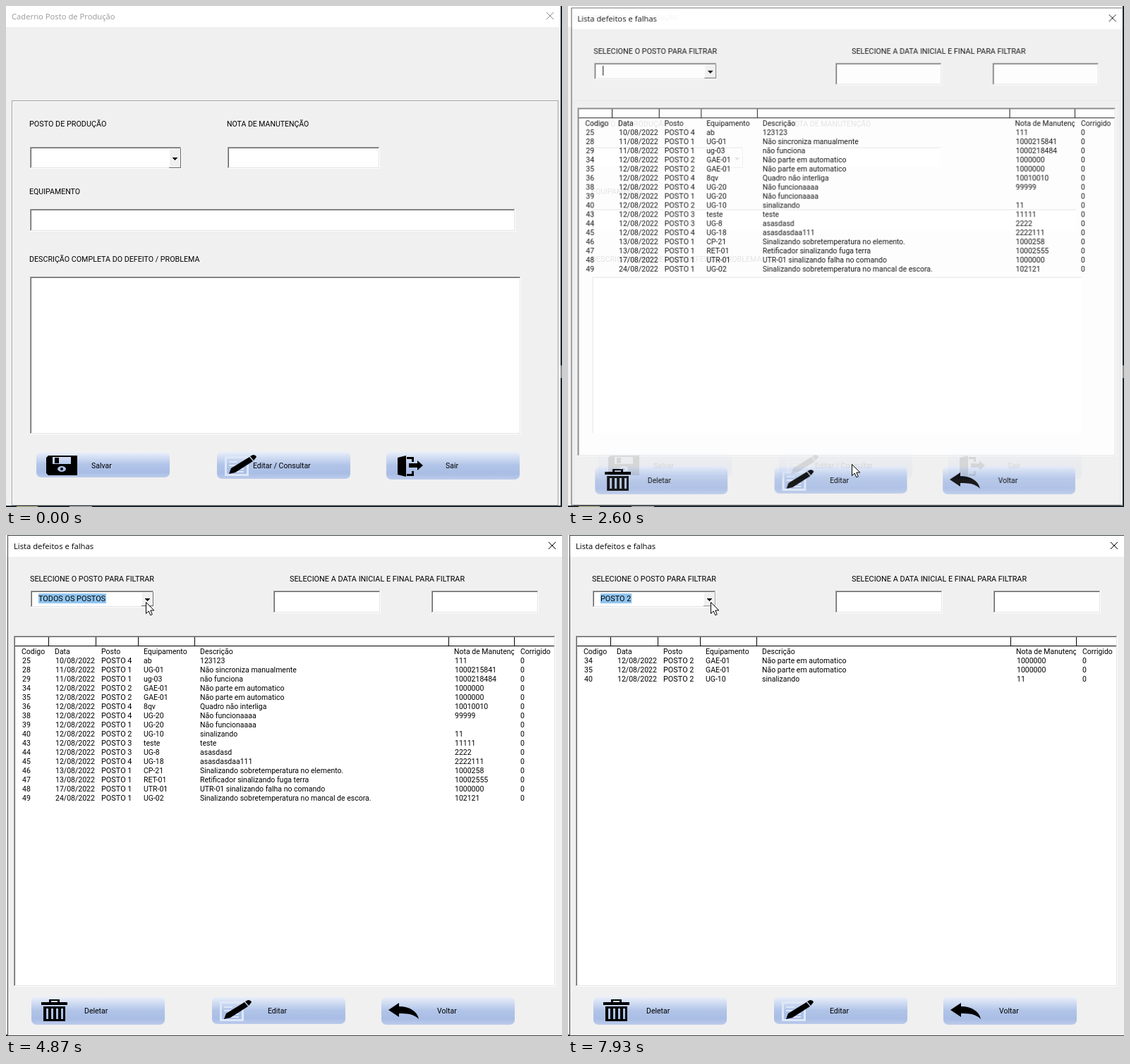
Write an HTML page with a canvas that moves like this. It is 788 by 711 pixels and loops after 8000 ms.

```html
<!DOCTYPE html>
<html lang="pt">
<head>
<meta charset="utf-8">
<style>
  html, body { margin: 0; width: 100%; height: 100%; overflow: hidden; background: #f0f0f0; }
  canvas, svg { position: absolute; left: 0; top: 0; }
  #list { transform-origin: 395px 355px; }
</style>
</head>
<body>
<canvas id="form" width="788" height="711"></canvas>
<canvas id="list" width="788" height="711"></canvas>
<svg id="pointer" width="14" height="21">
  <path d="M.5 .5V16.5L4.2 13L6.8 18.8L9.3 17.7L6.8 12H11.8Z" fill="#fff" stroke="#000"/>
</svg>
<script>
const LOOP = 8000, STEP = 200 / 3;
const formCanvas = document.getElementById('form');
const listCanvas = document.getElementById('list');
const pointer = document.getElementById('pointer');
let ctx;

const MENU_TOP = 104, ROW_HEIGHT = 13;
const OPTIONS = ['TODOS OS POSTOS', 'POSTO 1', 'POSTO 2', 'POSTO 3', 'POSTO 4'];
const COLUMNS = [22, 69, 135, 195, 275, 635, 729];
const HEADERS = ['Codigo', 'Data', 'Posto', 'Equipamento', 'Descrição', 'Nota de Manutenção', 'Corrigido'];
const ROWS = `25|10|4|ab|123123|111
28|11|1|UG-01|Não sincroniza manualmente|1000215841
29|11|1|ug-03|não funciona|1000218484
34|12|2|GAE-01|Não parte em automatico|1000000
35|12|2|GAE-01|Não parte em automatico|1000000
36|12|4|8qv|Quadro não interliga|10010010
38|12|4|UG-20|Não funcionaaaa|99999
39|12|1|UG-20|Não funcionaaaa|
40|12|2|UG-10|sinalizando|11
43|12|3|teste|teste|11111
44|12|3|UG-8|asasdasd|2222
45|12|4|UG-18|asasdasdaa111|2222111
46|13|1|CP-21|Sinalizando sobretemperatura no elemento.|1000258
47|13|1|RET-01|Retificador sinalizando fuga terra|10002555
48|17|1|UTR-01|UTR-01 sinalizando falha no comando|1000000
49|24|1|UG-02|Sinalizando sobretemperatura no mancal de escora.|102121`
  .split('\n').map(line => {
    const [code, day, post, ...rest] = line.split('|');
    return [code, `${day}/08/2022`, `POSTO ${post}`, ...rest, '0'];
  });

const ICONS = {
  disk: 'M14 8l3-3h41v28H17l-3-3zM23 7h26v10H23zM26 8h6v8h-6zM30 24a6 4 0 1 0 12 0a6 4 0 1 0-12 0zM34 24a2 2 0 1 0 4 0a2 2 0 1 0-4 0z',
  pencil: 'M17 32l3-8L46 8l5 6L26 30zM47 7l4-2q4 0 5 3l-4 5z',
  page: 'M11 7h34v28H11zM14 10h28v22H14zM17 14h12v2H17zM17 19h11v2H17zM25 24h13v2H25zM21 28h17v2H21z',
  exit: 'M16 9l12-3v30l-12-3zM29 8h10v7h-3v-4h-7zM29 35h10v-7h-3v4h-7zM32 17h12v-4l8 7-8 7v-4H32z',
  trash: 'M14 8h11V4h15v4h11v4H14zM28 6v2h9V6zM17 14h31v21H17zM21 17h3v15h-3zM28 17h3v15h-3zM35 17h3v15h-3zM42 17h3v15h-3z',
  back: 'M10 19L25 9v5C40 14 51 21 53 32C45 24 36 24 25 24v5z'
};

function box(x, y, w, h, color) {
  ctx.fillStyle = color;
  ctx.fillRect(x, y, w, h);
}

// y is the vertical middle of the capitals
function text(str, x, y, color = '#000', size = 10.5) {
  ctx.font = `${size}px Roboto, sans-serif`;
  ctx.fillStyle = color;
  ctx.fillText(str, x, y + 4);
}

function title(str, x, y, color) {
  ctx.font = '11.25px "Open Sans", sans-serif';
  ctx.fillStyle = color;
  ctx.fillText(str, x, y + 4);
}

function closeMark(x, y, color) {
  ctx.strokeStyle = color;
  ctx.lineWidth = 1;
  ctx.beginPath();
  for (const s of [-1, 1]) {
    ctx.moveTo(x - 5, y - 5 * s);
    ctx.lineTo(x + 5, y + 5 * s);
  }
  ctx.stroke();
}

function field(x, y, w, h) {
  box(x, y, w, h, '#fff');
  box(x, y, w - 1, h - 1, '#a0a0a0');
  box(x + 1, y + 1, w - 2, h - 2, '#e3e3e3');
  box(x + 1, y + 1, w - 3, h - 3, '#696969');
  box(x + 2, y + 2, w - 4, h - 4, '#fff');
}

function arrowButton(x, y, h, pressed) {
  box(x, y, 17, h, pressed ? '#a0a0a0' : '#696969');
  box(x, y, 16, h - 1, '#fff');
  box(x + 1, y + 1, 15, h - 2, '#f0f0f0');
  const top = y + Math.floor(h / 2) - 1;
  for (let i = 0; i < 4; i++) box(x + 5 + i, top + i, 7 - 2 * i, 1, '#000');
}

function button(x, y, h, label, labelX, labelY, icon) {
  const fill = ctx.createLinearGradient(0, y, 0, y + h);
  [[0, '#edf1fa'], [0.15, '#d9e3f5'], [0.5, '#b1c4e8'], [0.8, '#a9bde5'], [1, '#bccbeb']]
    .forEach(stop => fill.addColorStop(...stop));
  ctx.fillStyle = fill;
  ctx.beginPath();
  ctx.roundRect(x, y, 189, h, 7);
  ctx.fill();
  ctx.save();
  ctx.translate(x, y);
  if (icon === 'pencil') {
    ctx.fillStyle = '#dde7f8';
    ctx.fill(new Path2D(ICONS.page), 'evenodd');
  }
  ctx.fillStyle = '#000';
  ctx.fill(new Path2D(ICONS[icon]), 'evenodd');
  ctx.restore();
  text(label, labelX, labelY);
}

function drawForm() {
  ctx = formCanvas.getContext('2d');
  box(0, 0, 788, 711, '#f0f0f0');
  box(0, 0, 786, 30, '#fff');
  title('Caderno Posto de Produção', 8, 15, '#999');
  closeMark(771, 14, '#888');
  box(786, 0, 2, 711, '#1c272e');
  box(786, 510, 2, 18, '#8b9094');
  box(0, 709, 788, 2, '#1c272e');
  box(15, 710, 30, 1, '#e8dfa8');
  box(90, 710, 32, 1, '#ddd');

  ctx.lineWidth = 1;
  ctx.strokeStyle = '#fff';
  ctx.strokeRect(9.5, 135.5, 774, 573);
  ctx.strokeStyle = '#a0a0a0';
  ctx.strokeRect(8.5, 134.5, 774, 574);

  text('POSTO DE PRODUÇÃO', 33, 167, '#000', 10.8);
  text('NOTA DE MANUTENÇÃO', 313, 167);
  text('EQUIPAMENTO', 33, 263, '#000', 10.6);
  text('DESCRIÇÃO COMPLETA DO DEFEITO / PROBLEMA', 33, 359, '#000', 10.7);
  field(34, 200, 215, 31);
  arrowButton(231, 202, 28);
  field(314, 200, 216, 31);
  field(34, 288, 688, 32);
  field(34, 384, 696, 224);
  button(43, 633, 36, 'Salvar', 121, 652, 'disk');
  button(299, 632, 39, 'Editar / Consultar', 350, 652, 'pencil');
  button(539, 632, 40, 'Sair', 623, 652, 'exit');
}

function drawTable(filter) {
  field(11, 143, 768, 498);
  box(13, 157, 764, 1, '#000');
  for (const x of [60, 127, 187, 267, 627, 720]) box(x, 145, 1, 13, '#000');
  const rows = filter > 0 ? ROWS.filter(row => row[2] === OPTIONS[filter]) : ROWS;
  [HEADERS, ...rows].forEach((row, r) => row.forEach((cell, c) => {
    ctx.save();
    ctx.beginPath();
    ctx.rect(0, 158, c === 5 ? 720 : 777, 480);
    ctx.clip();
    const indent = r && [0, 1, 5].includes(c) ? 1 : 0;
    text(cell, COLUMNS[c] + indent, 165 + ROW_HEIGHT * r, '#000', r && c === 2 ? 10.9 : 10.5);
    ctx.restore();
  }));
}

function drawMenu(active) {
  box(35, 103, 176, 67, '#000');
  box(36, MENU_TOP, 174, 65, '#fff');
  if (active >= 0) {
    const top = MENU_TOP + ROW_HEIGHT * active;
    box(36, top, 174, ROW_HEIGHT, '#0078d7');
    if (!active) {
      ctx.strokeStyle = '#ff8728';
      ctx.setLineDash([1, 1]);
      ctx.strokeRect(36.5, top + 0.5, 173, 12);
      ctx.setLineDash([]);
    }
  }
  OPTIONS.forEach((option, i) =>
    text(option, 45, 111 + ROW_HEIGHT * i, i === active ? '#fff' : '#000', 10.85));
}

function drawList({ chosen, open, pressed, caret, active }) {
  ctx = listCanvas.getContext('2d');
  ctx.clearRect(0, 0, 788, 711);
  box(2, 0, 786, 711, '#3c4246');
  box(3, 1, 785, 709, '#f0f0f0');
  box(3, 1, 785, 30, '#fff');
  title('Lista defeitos e falhas', 11, 16, '#000');
  closeMark(774, 15, '#000');
  text('SELECIONE O POSTO PARA FILTRAR', 34, 62, '#000', 10.85);
  text('SELECIONE A DATA INICIAL E FINAL PARA FILTRAR', 402, 62, '#000', 10.85);
  field(35, 79, 175, 24);
  arrowButton(192, 81, 20, pressed);
  field(379, 79, 152, 32);
  field(603, 79, 152, 32);
  if (chosen >= 0) {
    const name = OPTIONS[chosen];
    ctx.font = '10.85px Roboto, sans-serif';
    box(46, 83, ctx.measureText(name).width + 1, 14, '#91c5f0');
    text(name, 46, 90, '#000', 10.85);
  } else if (caret) {
    box(47, 83, 1, 14, '#000');
  }
  drawTable(chosen);
  button(36, 655, 40, 'Deletar', 111, 675, 'trash');
  button(292, 655, 39, 'Editar', 371, 675, 'pencil');
  button(532, 655, 40, 'Voltar', 611, 675, 'back');
  if (open) drawMenu(active);
}

// time, x, y of the pointer tip
const PATH = [
  [930, 712, 593], [1600, 402, 650], [2670, 402, 650], [3070, 197, 172],
  [3530, 200, 90], [3670, 200, 90], [3870, 186, 104], [4130, 178, 106],
  [4330, 178, 106], [5070, 202, 92], [5200, 202, 92], [5670, 167, 120],
  [5870, 167, 120], [6600, 198, 93], [6670, 198, 93], [6800, 182, 107],
  [7330, 170, 134], [7530, 170, 134], [7930, 202, 95], [8000, 202, 95]
];

function pointerAt(t) {
  const i = Math.max(1, PATH.findIndex(key => key[0] > t));
  const [t0, x0, y0] = PATH[i - 1], [t1, x1, y1] = PATH[i];
  const u = Math.min(1, Math.max(0, (t - t0) / (t1 - t0)));
  const e = u * u * (3 - 2 * u);
  return [Math.round(x0 + (x1 - x0) * e), Math.round(y0 + (y1 - y0) * e)];
}

const within = (t, ...spans) => spans.some(([from, to]) => t >= from && t < to);

function render(now) {
  // the screen advances fifteen times a second
  const t = Math.floor((now % LOOP + 4) / STEP) * STEP % LOOP;
  const [x, y] = pointerAt(t);
  pointer.style.display = t >= 930 ? '' : 'none';
  pointer.style.transform = `translate(${x}px, ${y}px)`;

  const u = Math.min(1, Math.max(0, (t - 2330) / 400));
  const shown = 1 - (1 - u) ** 2;
  listCanvas.style.opacity = shown;
  listCanvas.style.transform = `scale(${1 - 0.06 * (1 - shown)})`;
  if (shown) {
    const chosen = t >= 7530 ? 2 : t >= 5870 ? 1 : t >= 4330 ? 0 : -1;
    drawList({
      chosen,
      open: within(t, [3670, 4330], [5070, 5870], [6600, 7530]),
      pressed: within(t, [3670, 3740], [5070, 5200], [6600, 6670], [7930, 8000]),
      caret: !within(t, [3200, 3670]),
      active: y >= MENU_TOP ? Math.floor((y - MENU_TOP) / ROW_HEIGHT) : chosen
    });
  }
  requestAnimationFrame(render);
}

drawForm();
requestAnimationFrame(render);
</script>
</body>
</html>
```
